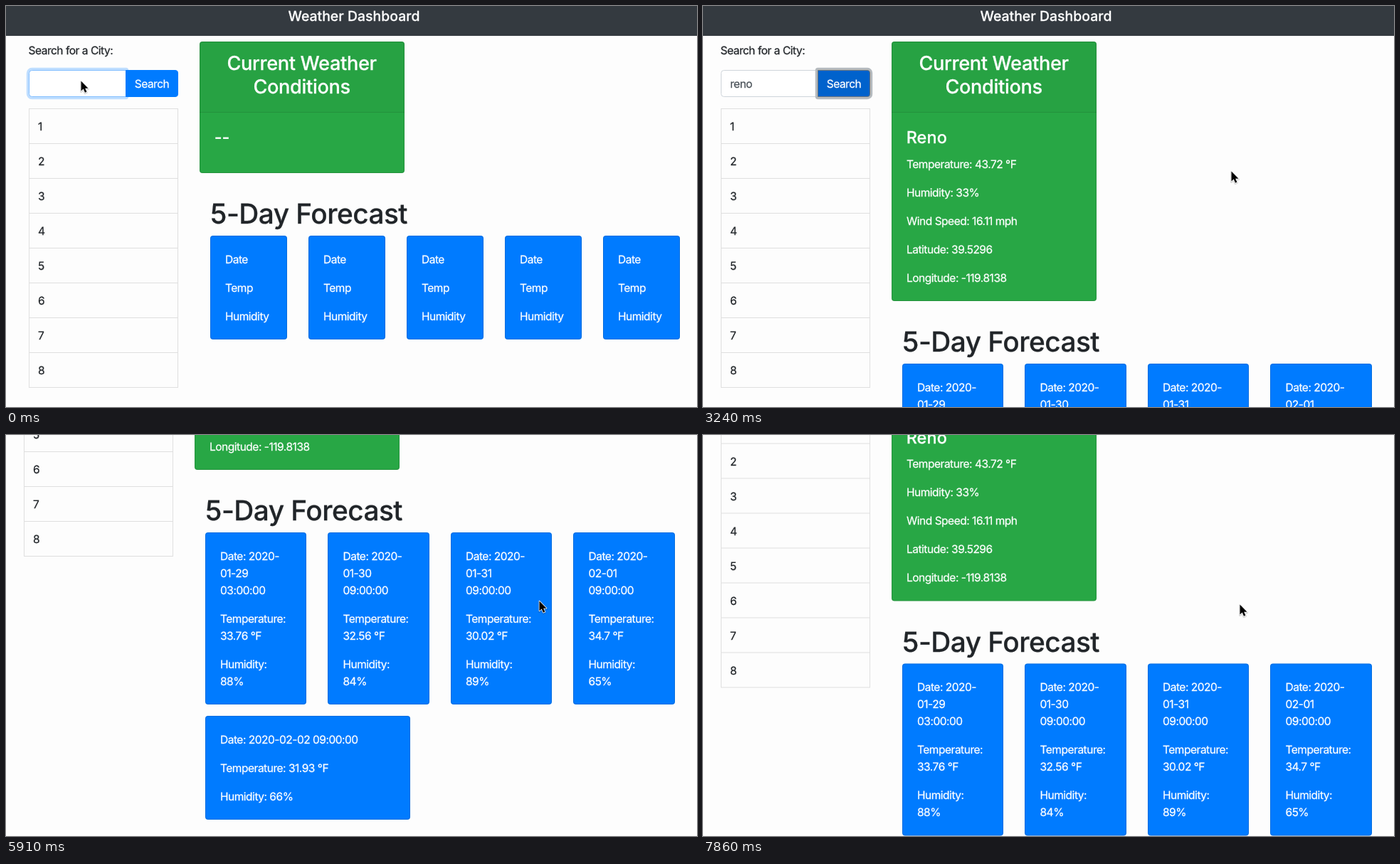
Animation, 971 px wide and 564 px high, one loop 8 s. Source, as an HTML page:

```html
<!DOCTYPE html>
<html lang="en">
<head>
<meta charset="utf-8">
<title>Weather Dashboard</title>
<style>
html, body { margin: 0; width: 100%; height: 100%; overflow: hidden; background: #fdfdfd; }
svg { display: block; width: 971px; height: 564px; }
text {
  font-family: Inter, "Open Sans", sans-serif; font-size: 15.5px; letter-spacing: -0.48px;
  color: #212529; fill: currentColor; stroke: currentColor; stroke-width: .25px;
  text-rendering: geometricPrecision;
}
.light { color: #fff; }
.typed { color: #495057; }
.mid { text-anchor: middle; }
.brand, .h2, .h3, .h1 { font-weight: 500; }
.brand { font-size: 19.4px; letter-spacing: 0.03px; }
.h2 { font-size: 27.2px; letter-spacing: -0.36px; }
.h3 { font-size: 23.4px; letter-spacing: 0.1px; }
.h1 { font-size: 38.8px; letter-spacing: -0.52px; }
</style>
</head>
<body>
<svg id="stage" viewBox="0 0 971 564" xmlns="http://www.w3.org/2000/svg"></svg>
<script>
const LOOP = 8000, STEPS = 54, EDGE = 'rgba(0,0,0,.125)';
const stage = document.getElementById('stage');

// Step, then the values at that step
const scrollKeys = [
  [23, 0], [26, 14], [29, 81.5], [31, 232], [32, 318], [33, 366], [41, 366],
  [42, 294], [43, 294], [45, 291.5], [50, 288.5], [51, 270], [52, 226], [53, 181.5]
];
const pointerKeys = [
  [5, 105, 105], [6, 115, 107], [9, 250, 146], [10, 276, 150], [13, 197, 113],
  [16, 197, 113], [18, 245, 123], [20, 470, 180], [21, 621, 212], [22, 742, 232],
  [23, 742, 232], [28, 744, 232], [34, 744, 232], [40, 749, 233], [42, 749, 233],
  [45, 751, 235], [53, 754, 238]
];

const days = [
  ['01-29', '03:00:00', '33.76', 88], ['01-30', '09:00:00', '32.56', 84],
  ['01-31', '09:00:00', '30.02', 89], ['02-01', '09:00:00', '34.7', 65]
];

function sample(keys, n) {
  if (n <= keys[0][0]) return keys[0].slice(1);
  for (let i = 1; i < keys.length; i++) {
    const a = keys[i - 1], b = keys[i];
    if (n <= b[0]) {
      const k = (n - a[0]) / (b[0] - a[0]);
      return a.slice(1).map((v, j) => v + (b[j + 1] - v) * k);
    }
  }
  return keys[keys.length - 1].slice(1);
}

const text = (x, y, str, cls = '') => `<text x="${x}" y="${y}" class="${cls}">${str}</text>`;

const rect = (x, y, w, h, fill, extra = '') =>
  `<rect x="${x}" y="${y}" width="${w}" height="${h}" fill="${fill}" ${extra}/>`;

const card = (x, y, w, h, fill) =>
  rect(x, y, w, h, fill, 'rx="4"') +
  rect(x + .5, y + .5, w - 1, h - 1, 'none', `rx="3.5" stroke="${EDGE}"`);

// Lines of white text, each at its own distance below the card's top
const lines = (x, y, rows, gaps) =>
  rows.map((row, i) => text(x + 21, y + gaps[i] + 5.7, row, 'light')).join('');

function searchBox(typed, clicked, hover) {
  const input = 'M168.5 90.5H36.5a4 4 0 0 0-4 4V123.5a4 4 0 0 0 4 4H168.5Z';
  const button = 'M168.5 90.5H238a3.5 3.5 0 0 1 3.5 3.5V124a3.5 3.5 0 0 1-3.5 3.5H168.5Z';
  const ring = (d, color) => `<path d="${d}" fill="none" stroke="${color}" stroke-width="7.4" stroke-linejoin="round"/>`;
  return (clicked ? '' : ring(input, '#bfdeff')) +
    `<path d="${input}" fill="#fff" stroke="${clicked ? '#ced4da' : '#80bdff'}"/>` +
    (clicked ? ring(button, '#b5babe') : '') +
    `<path d="${button}" fill="${clicked || hover ? '#0062cc' : '#007bff'}" stroke="${clicked ? '#6c757d' : '#007bff'}"/>` +
    text(45, 115, typed, 'typed') + text(205, 115, 'Search', 'light mid');
}

function cityList() {
  let out = rect(32.5, 144.5, 209, 392, 'none', 'stroke="#dfdfdf"');
  for (let i = 0; i < 8; i++) {
    const y = 144.5 + 49 * i;
    if (i) out += `<path d="M33 ${y}H241" stroke="#dfdfdf"/>`;
    out += text(45, y + 30.5, i + 1);
  }
  return out;
}

function currentCard(height, rows) {
  return card(272, 50, 288, height, '#28a745') +
    '<path d="M272 149V54a4 4 0 0 1 4-4H556a4 4 0 0 1 4 4V149Z" fill="#000" fill-opacity=".03"/>' +
    `<path d="M272 149.5H560" stroke="${EDGE}"/>` +
    text(415.6, 89.7, 'Current Weather', 'h2 light mid') +
    text(415.6, 123.2, 'Conditions', 'h2 light mid') +
    text(292.7, 193, rows.length ? 'Reno' : '--', 'h3 light') +
    lines(272, 50, rows, [172, 212, 252, 292, 332]);
}

function forecast(bottom, loaded) {
  const top = bottom + 88, gaps = [33, 73, 113];
  let out = text(287, bottom + 71.2, '5-Day Forecast', 'h1');
  if (!loaded) {
    for (let i = 0; i < 5; i++) {
      const x = 287 + 138 * i;
      out += card(x, top, 108, 146, '#007bff') + lines(x, top, ['Date', 'Temp', 'Humidity'], gaps);
    }
    return out;
  }
  days.forEach(([date, hour, temp, damp], i) => {
    const left = 287 + 172.5 * i, x = Math.floor(left), w = Math.floor(left + 142.5) - x;
    out += card(x, top, w, 242, '#007bff') + lines(left, top,
      ['Date: 2020-', date, hour, 'Temperature:', temp + ' °F', 'Humidity:', damp + '%'],
      [33, 57, 81, 121, 145, 185, 209]);
  });
  return out + card(287, top + 258, 288, 146, '#007bff') + lines(287, top + 258,
    ['Date: 2020-02-02 09:00:00', 'Temperature: 31.93 °F', 'Humidity: 66%'], gaps);
}

function pointer(x, y, hand) {
  if (!hand) {
    const shape = 'M0 0V14L3.2 11 5.5 16.2 7.9 15.2 5.7 10.2H10Z';
    return `<g transform="translate(${x + .5} ${y + .5})" stroke-linejoin="round">` +
      `<path d="${shape}" transform="translate(0 1)" fill="none" stroke="#000" stroke-opacity=".15" stroke-width="3"/>` +
      `<path d="${shape}" fill="#000" stroke="#fff" stroke-width="1.6" paint-order="stroke"/></g>`;
  }
  return `<g transform="translate(${x - 5} ${y - 1})" fill="#fff" stroke="#000" stroke-linejoin="round">` +
    '<path d="M4.6 11V2.6C4.6.4 7.2.4 7.2 2.6V7C7.6 5.8 9.6 6 9.8 7.4 10.4 6.4 12 6.8 12.2 8.1' +
    ' 13 7.5 14.4 8 14.4 9.4V12C14.4 14.5 13 15 13 17.5H6C5.8 15.5 2.6 13.4 1.2 10.6.4 8.8 2 8 3.2 9.2Z"/>' +
    '<path d="M7.4 12V15.2M9.5 12V15.2M11.6 12V15.2"/></g>';
}

function draw(n) {
  const clicked = n >= 14, found = n >= 15, loaded = n >= 16;
  const dx = found ? -7 : 0;
  const [scroll] = sample(scrollKeys, n);
  const [px, py] = sample(pointerKeys, n).map(Math.round);
  const hover = px > 168 + dx && px < 242 + dx && py > 90 && py < 128;
  const typed = ['', 're', 'ren', 'reno'][Math.min(n, 3)];
  const rows = [];
  if (found) rows.push('Temperature: 43.72 °F', 'Humidity: 33%', 'Wind Speed: 16.11 mph');
  if (loaded) rows.push('Latitude: 39.5296', 'Longitude: -119.8138');
  const height = loaded ? 365 : found ? 301 : 185;

  stage.innerHTML = rect(0, 0, 971, 564, '#fdfdfd') +
    `<g transform="translate(0 ${-scroll})">` + rect(0, 0, 971, 42, '#343a40') +
    `<g transform="translate(${dx} 0)">` +
    text(488.9, 21, 'Weather Dashboard', 'brand light mid') +
    text(31.5, 68, 'Search for a City:') +
    searchBox(typed, clicked, hover) + cityList() +
    currentCard(height, rows) + forecast(50 + height, loaded) +
    '</g></g>' + pointer(px, py, hover);
}

let shown = -1;
function tick(now) {
  // The small lead keeps each step from arriving late
  const n = Math.floor(((now % LOOP) + 20) / LOOP * STEPS) % STEPS;
  if (n !== shown) draw(shown = n);
  requestAnimationFrame(tick);
}
draw(0);
requestAnimationFrame(tick);
</script>
</body>
</html>
```
